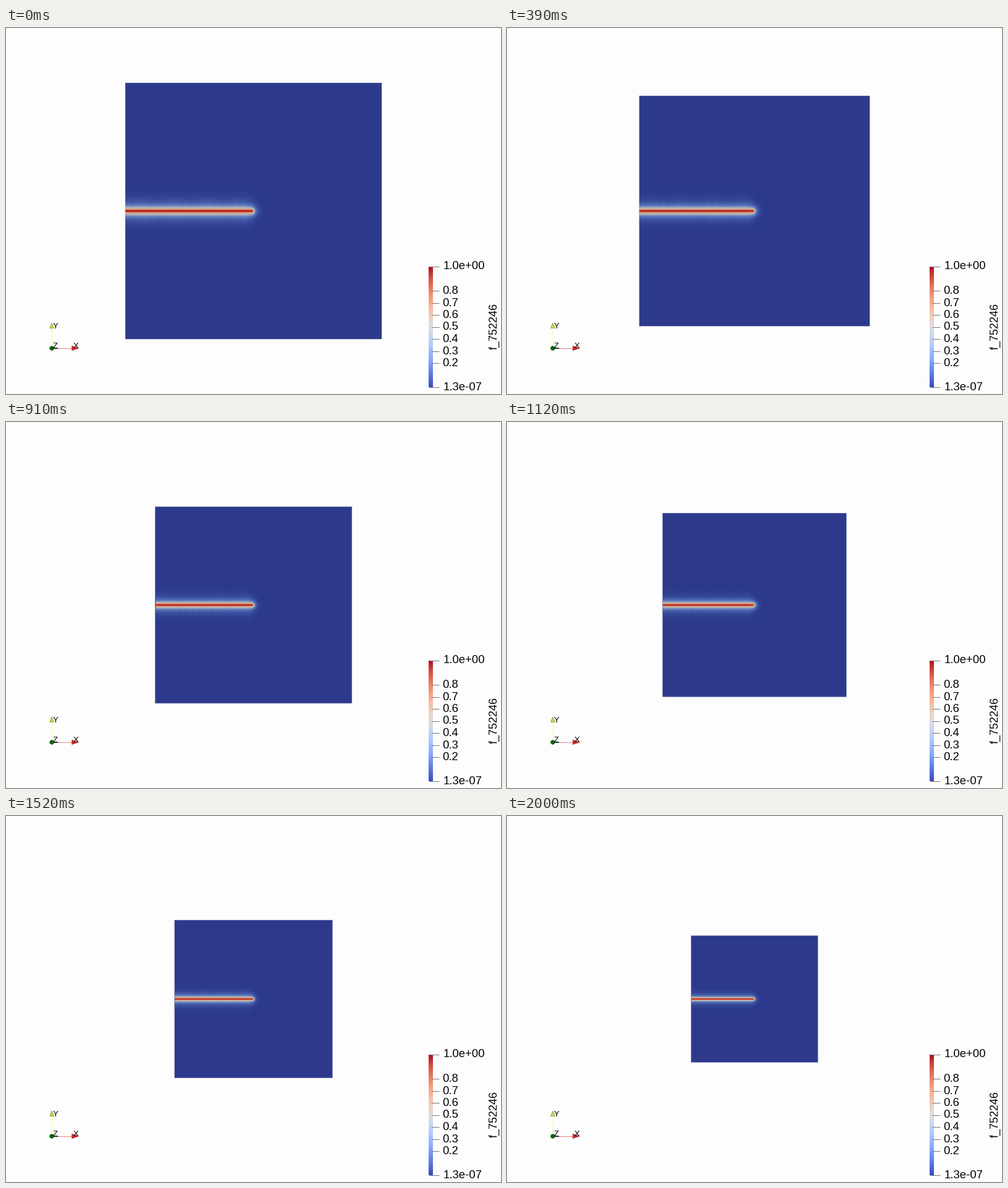
Recreate the animation shown at these times as a matplotlib script. Size 800 by 592 pixels, loop 2.03 s.

```python
import numpy as np
import matplotlib.pyplot as plt
from matplotlib.animation import FuncAnimation
from matplotlib.colors import LinearSegmentedColormap
from matplotlib.patches import Circle, Polygon, Rectangle

W, H, DPI = 800, 592, 100
CX, CY = 400, 296
STEPS, TICK = 51, 10
BACK = "#fdfdfd"
BLUE = (45 / 255, 58 / 255, 140 / 255)

plt.rcParams["font.family"] = "Liberation Sans"

fig = plt.figure(figsize=(W / DPI, H / DPI), dpi=DPI, facecolor=BACK)
ax = fig.add_axes([0, 0, 1, 1])
ax.axis("off")


def px(n):
    """Pixels to points."""
    return n * 72 / DPI


def label(x, y, text, size=18.5, **kw):
    ax.text(x, y, text, fontsize=px(size), color="black", **kw)


def line(x0, y0, x1, y1, color, width=1):
    ax.plot([x0, x1], [y0, y1], color=color, lw=px(width),
            solid_capstyle="butt")


def color_bar():
    x0, x1, top, bottom = 683, 690, 386, 581
    ramp = np.linspace(1, 0, 256)[:, None]
    ax.imshow(ramp, cmap="coolwarm", extent=(x0, x1, bottom, top),
              aspect="auto", interpolation="bilinear", zorder=1)
    for v in (0.2, 0.3, 0.4, 0.5, 0.6, 0.7, 0.8):
        y = bottom - v * (bottom - top)
        line(687, y, 700, y, "#777777")
        label(705.5, y + 5, f"{v:.1f}")
    line(684, top, 700, top, "#777777")
    line(684, bottom, 700, bottom, "#777777")
    label(707, 390, "1.0e+00")
    label(707, 586, "1.3e-07")
    label(798, 482.5, "f_752246", 18, rotation=90, ha="right", va="center")


def triad():
    line(73.5, 486, 73.5, 515, "#fbfba8")
    line(77, 517.5, 107, 517.5, "#f08080")
    line(76, 517.5, 84, 517.5, "#303040")
    ax.add_patch(Polygon([(74, 477), (70.8, 485.5), (77.4, 485.5)],
                         fc="#d6d63c", ec="#77772a", lw=px(0.6), zorder=3))
    ax.add_patch(Polygon([(117, 518), (106.5, 514.3), (106.5, 521.6)],
                         fc="#dc2626", ec="#8c2020", lw=px(0.6), zorder=3))
    ax.add_patch(Circle((74, 518), 3.7, fc="#0a650a", ec="none", zorder=3))
    label(75.5, 485.5, "Y", 13, zorder=4)
    label(108.5, 518, "X", 13, zorder=4)
    label(76, 517.5, "Z", 13, zorder=4)


def hold(i):
    """Display time of zoom step i, in ms; the cadence repeats every second."""
    k = i % 25
    if k == 12:
        return 40
    return 60 if (k - (k > 12)) % 3 == 1 else 30


timeline = np.repeat(np.arange(STEPS), [hold(i) // TICK for i in range(STEPS)])

shades = LinearSegmentedColormap.from_list("lit", [
    (0.0, BLUE),
    (0.25, (0.34, 0.46, 0.74)),
    (0.5, (0.73, 0.73, 0.73)),
    (0.75, (0.85, 0.55, 0.42)),
    (0.92, (0.76, 0.22, 0.15)),
    (1.0, (0.70, 0.09, 0.11)),
], N=512)

# Pixel grid of the strip that holds the crack
X0, X1, Y0, Y1 = 190, 610, 232, 360
gx, gy = np.meshgrid(np.arange(X0, X1) + 0.5 - CX,
                     np.arange(Y0, Y1) + 0.5 - CY)


def crack(half):
    """RGBA strip of the damage field; the halo narrows around the tip."""
    x, y = gx / half, gy / half
    dist = np.hypot(np.maximum(x + 0.012, 0), y)
    behind = 0.5 - 0.5 * np.tanh((x + 0.01) / 0.03)
    mesh = 1 + 0.03 * np.sin(61 * x + 9 * np.sign(y)) * np.sin(37 * x + 1)
    reach = 0.034 * mesh * (0.6 + 0.4 * behind)
    rgba = shades(np.exp(-np.maximum(dist - 0.002, 0) / reach))
    rgba[..., 3] = np.abs(gx) <= half - 0.5
    return rgba


plate = ax.add_patch(Rectangle((0, 0), 1, 1, fc=BLUE, ec=(*BLUE, 0.5),
                               lw=px(1), joinstyle="round",
                               snap=False, zorder=1))
strip = ax.imshow(crack(207), extent=(X0, X1, Y1, Y0), aspect="auto",
                  interpolation="nearest", zorder=2)
color_bar()
triad()
ax.set_xlim(0, W)
ax.set_ylim(H, 0)


def draw(n):
    half = 207 - 2.095 * timeline[n]
    plate.set_bounds(CX - half, CY - half, 2 * half, 2 * half)
    strip.set_data(crack(half))
    return plate, strip


anim = FuncAnimation(fig, draw, frames=len(timeline), interval=TICK,
                     repeat=True, repeat_delay=0)
plt.show()
```
